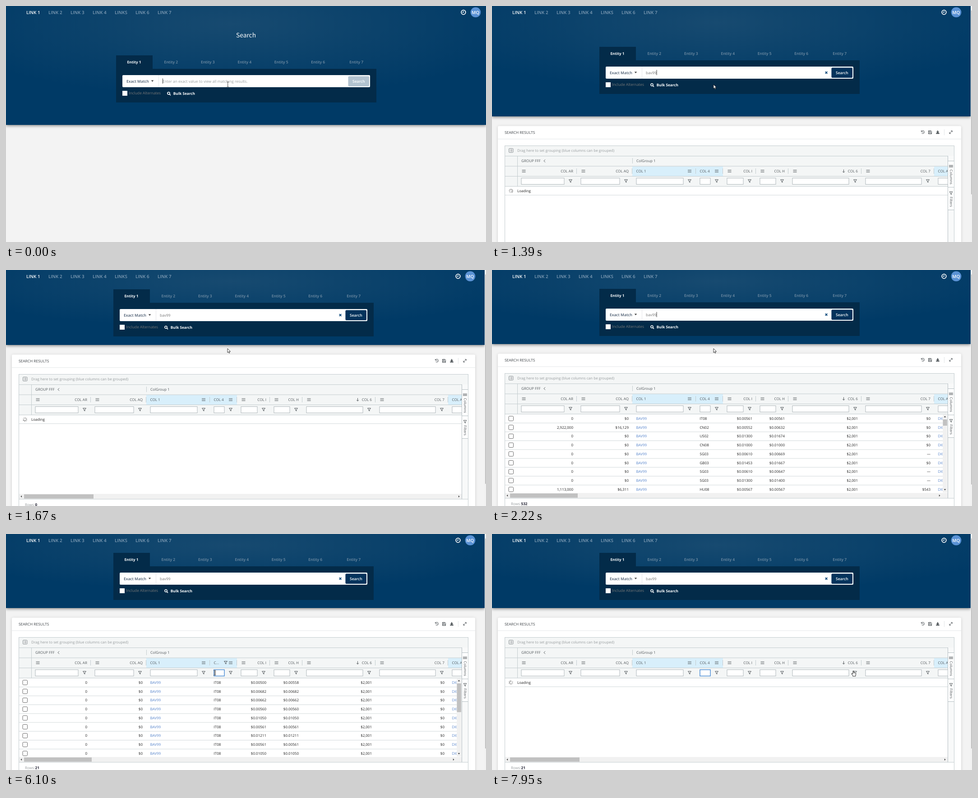
Recreate the animation shown at these times as an HTML page. Size 1064x526 px, loop 8 s.

```html
<!DOCTYPE html>
<html lang="en">
<head>
<meta charset="utf-8">
<title>Search results grid</title>
<style>
  html, body { margin: 0; width: 100%; height: 100%; overflow: hidden; background: #f3f3f3; }
  svg { display: block; width: 1064px; height: 526px; }
  text { font: 8.1px "Open Sans", "Noto Sans", sans-serif; fill: #52585c; text-rendering: geometricPrecision; white-space: pre; }
  .end { text-anchor: end; }
  .mid { text-anchor: middle; }
  .nav { font-size: 9.9px; font-weight: 600; fill: #809db5; }
  .tab { font-size: 8.5px; font-weight: 600; fill: #7590a6; }
  .on { fill: #fff; }
  .bold { font-size: 8.2px; font-weight: 700; }
  .field { font-size: 8.4px; fill: #777; }
  .title { font: 13.8px "Noto Sans CJK JP", "Noto Sans CJK SC", "Open Sans", sans-serif; fill: #fff; }
  .cell { font-size: 8px; fill: #222; }
  .link { fill: #5583cb; }
  .faint { fill: #979c9e; }
  .ln { fill: none; stroke: #c3cccf; }
  .ic { fill: none; stroke: #4d5357; stroke-width: 1; }
  #hero { filter: drop-shadow(0 2px 3px rgba(0, 0, 0, .45)); }
  #card { filter: drop-shadow(0 1px 3px rgba(0, 0, 0, .15)); }
</style>
</head>
<body>
<svg id="stage" viewBox="0 0 1064 526"></svg>
<script>
const LOOP = 8000, STEP = 69;
const rect = (x, y, w, h, fill, more = '') => `<rect x="${x}" y="${y}" width="${w}" height="${h}" fill="${fill}" ${more}/>`;
const text = (x, y, s, cls = '', more = '') => `<text x="${x}" y="${y}" class="${cls}" ${more}>${s}</text>`;
const path = (d, cls = 'ic', more = '') => `<path d="${d}" class="${cls}" ${more}/>`;
const group = (id, body, more = '') => `<g id="${id}" ${more}>${body}</g>`;
const menu = (x, y) => path(`M${x - 4} ${y - 2.5}h8m-8 2.5h8m-8 2.5h8`, 'ic', 'stroke-width=".8" opacity=".8"');
const funnel = (x, y) => path(`M${x - 3.5} ${y - 3}h7l-2.6 3.2v3l-1.8-1v-2z`, 'ic', 'stroke-width=".9"');
const tri = (x, y, r, turn) => `<path d="M${-r} ${-r / 2}H${r}L0 ${r / 2 + .5}z" fill="#444" transform="translate(${x} ${y}) rotate(${turn})"/>`;

// Page header
const navX = [45, 94, 143, 192, 241, 287, 336];
const nav = navX.map((x, i) =>
  text(x, i === 4 ? 18.4 : 18, i === 4 ? 'LINKS' : 'LINK ' + (i + 1), i ? 'nav' : 'nav on')).join('');

const account = `<circle cx="1014" cy="14" r="4.8" fill="none" stroke="#fff" stroke-width="1.8"/>
  <path d="M1014 11v3.4h-2.4" fill="none" stroke="#fff" stroke-width="1.2"/>
  <circle cx="1041" cy="14" r="11.3" fill="#5a92d5"/>` + text(1040.8, 17.7, 'MQ', 'nav on mid');

// Search panel
const tabX = [284, 365.8, 447.3, 528.8, 610.2, 691.7, 776.7];
const panel = rect(244, 110, 81, 31, '#032b49') + rect(244, 140, 577, 75, '#032b49') +
  tabX.map((x, i) => text(x, 128.2, 'Entity ' + (i + 1), i ? 'tab mid' : 'bold on mid')).join('') +
  rect(258, 154, 549, 27, '#fff', 'rx="2"') + rect(338, 154, 1, 27, '#e4e7e9') +
  text(267, 170.5, 'Exact Match', 'tab', 'style="fill:#44566b"') + tri(324.5, 167, 2.8, 0) +
  text(347, 170.5, 'Enter an exact value to view all matching results.', 'field faint', 'id="hint"') +
  text(347, 170.5, '', 'field', 'id="query"') + rect(347, 161.5, .9, 11.5, '#222', 'id="caret"') +
  path('M744.8 165.2l4.6 4.6m0-4.6l-4.6 4.6', '', 'id="clear" stroke="#0c4a7c" stroke-width="1.7"') +
  rect(758.5, 156.5, 46.5, 22.5, '#b3c3d0', 'rx="2"') +
  rect(758.5, 156.5, 46.5, 22.5, '#04335c', 'rx="2" id="ready"') +
  text(781.8, 170.7, 'Search', 'tab on mid') +
  rect(258, 189, 11, 11, '#fff') + text(272.3, 197.2, 'Include Alternates', 'field on') +
  '<circle cx="360.5" cy="194.5" r="2.6" fill="none" stroke="#fff" stroke-width="1.5"/>' +
  path('M362.5 196.5l2.4 2.6', '', 'stroke="#fff" stroke-width="1.7"') +
  text(370.8, 198.2, 'Bulk Search', 'bold on');

// Grid: left, right, label, left aligned
const cols = [
  [56, 188, 'COL AR'], [188, 311, 'COL AQ'], [311, 452, 'COL 1', 1], [452, 512, 'COL 4', 1],
  [512, 585, 'COL I'], [585, 657, 'COL H'], [657, 819, 'COL 6'], [819, 980, 'COL 7'], [980, 1120, 'COL A1', 1]
];
const header = cols.map(([l, r, label, left], i) =>
  (left ? rect(l, 276.5, r - l, 21.5, '#d8effb') : '') +
  text(left ? l + 8.5 : r - 8, 290, label, left ? '' : 'end', `id="head${i}"`) +
  menu(left ? r - 14 : l + 14.5, 287) + path(`M${r - .5} 281v12`, 'ln') +
  rect(l + 9, 302.5, r - l - 37, 14, '#fff', `stroke="#aeb6ba" id="filter${i}"`) + funnel(r - 14, 309)).join('');

const rowY = i => 331 + 19.75 * i;
const makeRow = ([units, spend, code, low, high, last], i) => {
  const y = rowY(i), b = y + 2.9;
  const values = [units, spend, 'BAV99', code, '$0.0' + low, '$0.0' + high, '$2,001', last, 'DIODE'];
  return path(`M28 ${y + 10}H999`, 'ln', 'opacity=".75"') +
    rect(37, y - 5.2, 10.4, 10.4, '#fff', 'rx="1.8" stroke="#666"') +
    cols.map(([l, r, , left], c) =>
      text(left ? l + 8.5 : r - 8, b, values[c], (left ? 'cell' : 'cell end') + (c === 2 || c === 8 ? ' link' : ''))).join('');
};
const allRows = [
  'IT08 0561 0561', 'CN02 0552 0632', 'US02 1300 1674', 'CN08 1000 1000', 'SG03 0610 0669',
  'GB03 1453 1667', 'SG03 0610 0647', 'SG03 1300 1400', 'HU08 0567 0567'
].map((s, i) => {
  const [code, low, high] = s.split(' ');
  const [units, spend] = { 1: ['2,922,000', '$16,129'], 8: ['1,113,000', '$6,311'] }[i] || ['0', '$0'];
  return [units, spend, code, low, high, code === 'SG03' ? '—' : i === 8 ? '$543' : '$0'];
});
const someRows = '0500 0682 0662 0560 1050 0561 1211 0561 1050'.split(' ')
  .map((p, i) => ['0', '$0', 'IT08', p, i ? p : '0558', '$0']);

const tools =
  path('M952 198.5a3.4 3.4 0 1 1 .3 3.5M951.5 196.5v2.5h2.7M955.3 198.5v2l1.3.9') +
  path('M967.5 197h5.5l1.5 1.5v5.5h-7zM969 197v2.3h3.2V197M969 204v-2.6h4V204') +
  path('M988 196.5v4M985.6 199l2.4 2.5 2.4-2.5', 'ic', 'style="stroke-width:1.8"') +
  path('M984.3 203h7.4', 'ic', 'style="stroke-width:2.2"') + path('M1002.5 194v13', 'ln', 'opacity=".5"') +
  path('M1014 203.3l6.2-6.2m-3 0h3v3m-3.2 3.2h-3v-3');

const spokes = Array.from({ length: 8 }, (_, i) =>
  `<path d="M0-2v-3" stroke="#444" opacity="${1 - i * .08}" transform="rotate(${-45 * i})"/>`).join('');

const side = rect(1010, 253, 15, 256, '#f8f9f9') + rect(1010, 264.5, 14.5, 108.5, '#fff') +
  path('M1010.5 253V509M1010 264.5h14.5M1010 323h14.5M1010 373.5h14.5', 'ln', 'style="stroke:#b4bec2"') +
  path('M1014 273v6m2.3-6v6m2.3-6v6m2.3-6v6', 'ic', 'stroke-width=".9"') + funnel(1017.5, 336) +
  text(0, 0, 'Columns', '', 'transform="translate(1014.6 283.3) rotate(90)"') +
  text(0, 0, 'Filters', '', 'transform="translate(1014.6 344) rotate(90)"');

const results =
  rect(13, 186.5, 1027, 420, '#fff', 'rx="3" id="card"') +
  text(28, 203.7, 'SEARCH RESULTS', '', 'style="font-size:8.4px;fill:#3f4448"') + tools +
  path('M13 215.5H1040', 'ln', 'opacity=".45"') +
  rect(28, 230.5, 997, 91, '#f4f6f6') +
  rect(37.5, 236.5, 9.5, 9, 'none', 'rx="1.5" stroke="#8d9396"') +
  path('M39.5 239h1m1 0h3.5m-5.5 2h1m1 0h3.5m-5.5 2h1m1 0h3.5', 'ic', 'opacity=".6"') +
  text(56, 244.2, 'Drag here to set grouping (blue columns can be grouped)', 'faint') +
  text(65, 267.4, 'GROUP FFF') + path('M118 261.3l-3 3 3 3') + text(320, 267.4, 'ColGroup 1') +
  `<g clip-path="url(#wide)">${header}</g>` +
  group('sort', path('M779.5 283.5v6.5m-2.5-2.3l2.5 2.5 2.5-2.5')) +
  group('mark', funnel(487, 286.5)) +
  path('M28 253.5H1025M28 276H1010M28 298.5H1010M28 321H1010M56.5 253V321M311.5 258v12', 'ln') +
  group('all', allRows.map(makeRow).join(''), 'clip-path="url(#body)"') +
  group('some', someRows.map(makeRow).join(''), 'clip-path="url(#body)"') +
  group('loading', group('spin', spokes) + text(56, 333.9, 'Loading', '', 'style="fill:#222"') +
    path('M28 340.5H1010', 'ln', 'opacity=".75"')) +
  group('vbar', rect(999, 321.5, 10.5, 174.5, '#f1f1f1') + rect(999.5, 333, 9.5, 14, '#c1c1c1', 'id="vthumb"') +
    tri(1004, 327, 2.3, 180) + tri(1004, 489.5, 2.3, 0)) +
  rect(28, 497, 982, 11.5, '#f1f1f1') + rect(40, 498, 150, 9.5, '#c1c1c1', 'id="hthumb"') +
  tri(34, 502.7, 2.3, 90) + group('harrow', tri(992, 502.7, 2.3, -90)) + side +
  path('M28 508.8H1025M28.5 230.5V640M1024.5 230.5V640M28 230.5H1025', 'ln') +
  text(42, 524, 'Rows:', 'faint') + text(64.5, 524, '', 'bold', 'id="count" style="fill:#223"') +
  text(463.8, 312.2, '', 'cell', 'id="typed"') + rect(464, 304, .8, 11, '#222', 'id="caret2"');

// Pointers, with the hot spot at the origin
const pointers =
  group('beam', path('M-2.2-5.5h1.6l.6.6.6-.6h1.6M0-4.9V4.7M-2.2 5.3h1.6l.6-.6.6.6h1.6', '', 'fill="none" stroke="#333" stroke-width=".9"')) +
  group('arrow', path('M0 0v9.2l2.1-2 1.4 3.2 1.5-.7-1.4-3h2.9z', '', 'fill="#fff" stroke="#111" stroke-width=".8"')) +
  group('hand', path('M-1-5.5q1-1.1 1.9 0v3.4l3.8.9q1.3.4 1 1.8l-.8 3.4v2H-1.3v-1.6L-3.8 1q-.6-1.5 1-1.2L-1 1z', '', 'fill="#fff" stroke="#111" stroke-width=".9"'));

const stage = document.getElementById('stage');
stage.innerHTML = `<defs>
  <radialGradient id="sky" cx=".47" cy=".15" r=".62">
    <stop offset="0" stop-color="#174a70"/><stop offset=".5" stop-color="#0b426b"/><stop offset="1" stop-color="#003a66"/>
  </radialGradient>
  <clipPath id="wide"><rect x="28" y="253" width="982" height="70"/></clipPath>
  <clipPath id="body"><rect x="28" y="321" width="971" height="175.5"/></clipPath>
  </defs>` + rect(0, 0, 1064, 526, '#f3f3f3') + group('results', results) +
  rect(0, 0, 1064, 265, 'url(#sky)', 'id="hero"') + nav + group('account', account) +
  text(532, 70.3, 'Search', 'title mid', 'id="title"') + group('panel', panel) +
  group('pagebar', rect(1061, 0, 3, 526, '#f1f1f1') + rect(1062, 10, 2, 468, '#c1c1c1', 'id="pagethumb"')) +
  group('pointer', pointers);

const el = {};
stage.querySelectorAll('[id]').forEach(e => el[e.id] = e);
const show = (id, on) => el[id].style.display = on ? '' : 'none';
const set = (id, name, value) => el[id].setAttribute(name, value);
const move = (id, x, y) => set(id, 'transform', `translate(${x} ${y})`);
const put = (id, s) => { if (el[id].textContent !== s) el[id].textContent = s; };
const within = (t, a, b) => t >= a && t < b;
const clamp = v => Math.max(0, Math.min(1, v));
const ease = v => v * v * (3 - 2 * v);
// Value of the last [time, value] pair already reached
const latest = (t, list) => list.reduce((v, [at, next]) => t >= at ? next : v, list[0][1]);

const heroSteps = [246, 215, 186, 172, 167, 165];
const panelSteps = [-19, -38, -56, -64, -67, -68];

function draw(t) {
  const open = t >= 1390;
  const step = Math.min(5, Math.floor((t - 1390) / STEP));
  const height = open ? heroSteps[step] : 265;

  set('hero', 'height', height);
  set('hero', 'width', open ? 1061 : 1064);
  move('account', open ? -12 : 0, 0);
  move('panel', open ? -6 : 0, open ? panelSteps[step] : 0);
  move('results', 0, height - 165);
  set('pagethumb', 'height', 468 - (height - 165) * .72);
  show('title', !open);
  show('results', open);
  show('pagebar', open);

  // Search box
  const query = 'bav99'.slice(0, latest(t, [[0, 0], [130, 1], [200, 2], [400, 3], [530, 4], [870, 5]]));
  put('query', query);
  show('hint', !query);
  show('clear', query);
  set('caret', 'x', 347 + (query ? el.query.getComputedTextLength() : 0));
  show('caret', t < 1450 || within(t, 2220, 2770));
  set('ready', 'opacity', clamp((t - 335) / 325 * (t >= 400)));

  // Column filter
  const typed = 'IT08'.slice(0, latest(t, [[0, 0], [2970, 1], [3260, 2], [3590, 3], [3850, 4],
    [5310, 3], [5640, 2], [5840, 1], [6100, 0]]));
  put('typed', typed);
  set('caret2', 'x', 463.8 + (typed ? el.typed.getComputedTextLength() : 0));
  show('caret2', within(t, 2840, 4380) || within(t, 5310, 5440) || within(t, 5840, 6630));
  const focus = t >= 2840;
  set('filter3', 'stroke', focus ? '#4e8fd6' : '#aeb6ba');
  set('filter3', 'stroke-width', focus ? 1.5 : 1);

  // Grid body
  const filtered = within(t, 4710, 6370);
  const loading = within(t, 1390, 2150) || within(t, 4710, 4840) || t >= 6370;
  put('head3', filtered ? 'C...' : 'COL 4');
  show('mark', filtered);
  show('all', !loading && !filtered);
  show('some', !loading && filtered);
  show('loading', loading);
  show('vbar', !loading);
  set('vthumb', 'height', filtered ? 64 : 14);
  set('spin', 'transform', `translate(42 331) rotate(${Math.floor(t / STEP) * 360 * STEP / 1000})`);
  const wide = loading && !within(t, 6370, 7190);
  set('hthumb', 'width', wide ? 154 : 150);
  move('harrow', wide ? 12 : 0, 0);
  put('count', t < 2150 ? '0' : t < 4840 ? '532' : '21');

  // Pointer
  const glide = ease(clamp((t - 7190) / 600));
  const kind = t < 400 ? 'beam' : t < 1390 ? '' : t < 2840 ? 'arrow' : t < 7190 ? 'beam' : t < 7790 ? 'arrow' : 'hand';
  for (const k of ['beam', 'arrow', 'hand']) show(k, k === kind);
  if (t < 1390) move('pointer', 491.7, 174.7);
  else if (t < 2770) move('pointer', 491, 175);
  else if (t < 2840) move('pointer', 480, 245);
  else move('pointer', 462.3 + 338.7 * glide, 309.5 + 1.5 * glide);
}

const start = performance.now();
(function tick() {
  draw((performance.now() - start) % LOOP);
  requestAnimationFrame(tick);
})();
</script>
</body>
</html>
```
